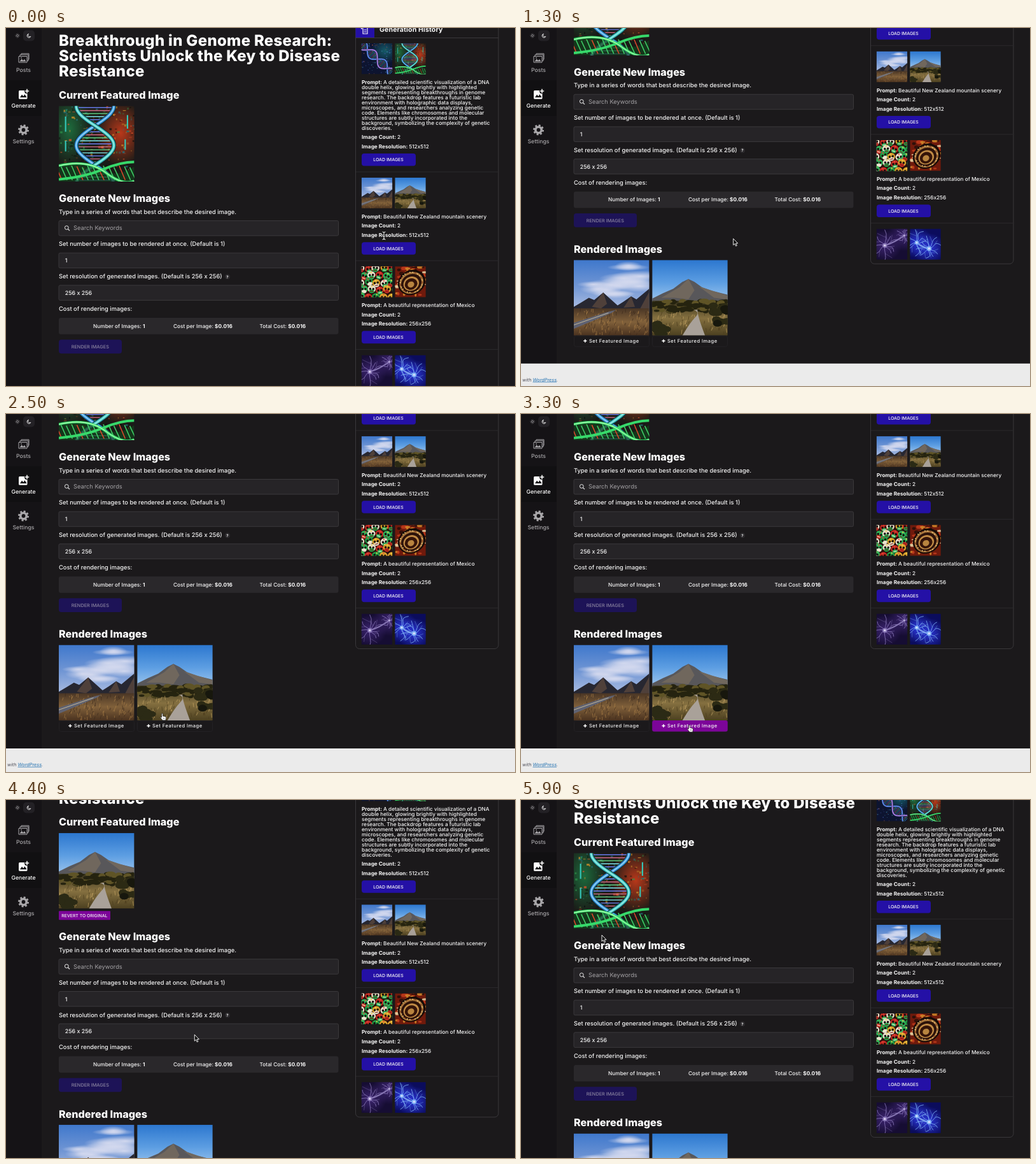
An HTML page that plays this animation: 800x562 px, repeating every 6000 ms.

```html
<!DOCTYPE html>
<html lang="en">
<head>
<meta charset="utf-8">
<title>Image generator</title>
<style>
  html, body { margin: 0; width: 100%; height: 100%; overflow: hidden; background: #1b191b; }
  svg { display: block; }
  #stage { width: 800px; height: 562px; }
  text { font-family: Inter, sans-serif; font-optical-sizing: none; text-rendering: geometricPrecision; white-space: pre; }
</style>
</head>
<body>
<script>
const LOOP = 6000;
const BLUE = '#2410a6', PURPLE = '#7c0599';

// ---------- drawing helpers ----------
const text = (x, y, size, str, { fill = '#f6f6f6', weight = 500, more = '' } = {}) =>
  `<text x="${x}" y="${y}" font-size="${size}" fill="${fill}" font-weight="${weight}" ${more}>${str}</text>`;
const rect = (x, y, w, h, fill, more = '') =>
  `<rect x="${x}" y="${y}" width="${w}" height="${h}" fill="${fill}" ${more}/>`;
const path = (d, fill, more = '') => `<path d="${d}" fill="${fill}" ${more}/>`;
const line = (d, color, width = 1, more = '') =>
  `<path d="${d}" fill="none" stroke="${color}" stroke-width="${width}" ${more}/>`;
const dot = (x, y, r, fill, more = '') => `<circle cx="${x}" cy="${y}" r="${r}" fill="${fill}" ${more}/>`;
const oval = (x, y, rx, ry, fill, more = '') =>
  `<ellipse cx="${x}" cy="${y}" rx="${rx}" ry="${ry}" fill="${fill}" ${more}/>`;
const bold = s => `<tspan font-weight="650">${s}</tspan>`;
const pic = (id, x, y, size) => `<use href="#${id}" x="${x}" y="${y}" width="${size}" height="${size}"/>`;
const many = (n, fn) => Array.from({ length: n }, (_, i) => fn(i)).join('');
const centred = 'text-anchor="middle"';

function random(seed) {
  return () => {
    seed = (seed + 0x6D2B79F5) | 0;
    let v = Math.imul(seed ^ (seed >>> 15), 1 | seed);
    v = (v + Math.imul(v ^ (v >>> 7), 61 | v)) ^ v;
    return ((v ^ (v >>> 14)) >>> 0) / 4294967296;
  };
}

const gradient = (id, ...stops) =>
  `<linearGradient id="${id}" x1="0" y1="0" x2="0" y2="1">${stops.map((c, i) =>
    `<stop offset="${i / (stops.length - 1)}" stop-color="${c}"/>`).join('')}</linearGradient>`;
const glow = (id, color) =>
  `<radialGradient id="${id}"><stop offset="0" stop-color="${color}"/><stop offset="1" stop-color="${color}" stop-opacity="0"/></radialGradient>`;
const symbol = (id, body) => `<symbol id="${id}" viewBox="0 0 100 100">${body}</symbol>`;

// ---------- pictures, each on a 100 x 100 field ----------
function helix(cx, amp, half, start, colors, rungs) {
  const at = (y, s) => cx + s * amp * Math.sin(Math.PI * (y - start) / half);
  const strand = s => 'M' + many(71, i => `${at(i * 2 - 20, s).toFixed(1)} ${i * 2 - 20} `);
  const bars = many(34, i => {
    const y = i * 4 - 18;
    return line(`M${at(y, -1)} ${y}H${at(y, 1)}`, rungs[i % rungs.length], 1.4, 'opacity=".85"');
  });
  return bars + [-1, 1].map((s, i) =>
    line(strand(s), '#12323f', 6) + line(strand(s), colors[i], 4) +
    line(strand(s), '#d8f4ff', 1, 'opacity=".8"')).join('');
}

function dnaLab() {
  const r = random(11);
  return rect(0, 0, 100, 100, '#1a1b17') +
    oval(82, 36, 34, 44, 'url(#red)') + oval(14, 30, 30, 50, 'url(#green)') +
    many(200, () => rect(r() * 100, r() * 85, 1 + r() * 3, 1 + r() * 2,
      ['#d8502a', '#2f9a4c', '#c58b2c', '#27717a', '#0c0f0c'][r() * 5 | 0], `opacity="${.3 + r() * .55}"`)) +
    line('M9 14V34M9 46V60M91 12V30M88 44V58', '#35c6b8', 1.8) +
    helix(48, 25, 52, 26, ['#3a9be0', '#45cfc4'], ['#7fe6ee', '#6a7cf0', '#e0708c', '#62d98a']) +
    path('M0 100V76Q30 72 54 84T100 80V100Z', '#123f1c', 'opacity=".75"') +
    many(16, i => line(`M${i * 7 - 4} ${79 + i % 3}L${i * 7 + 4} 98`, i % 4 ? '#3fd168' : '#e0482c', 1.3)) +
    line('M0 79Q38 70 62 88T100 99M0 97Q34 94 58 84T100 74', '#37d96b', 3.2) +
    line('M0 79Q38 70 62 88T100 99', '#b9ffb6', .9);
}

function dnaBlue() {
  const r = random(5);
  return rect(0, 0, 100, 100, '#0d1430') + oval(76, 24, 46, 44, 'url(#teal)') +
    many(90, () => dot(r() * 100, r() * 100, .6 + r() * 1.6, ['#3f8fae', '#93503f', '#3c4fa0'][r() * 3 | 0], 'opacity=".7"')) +
    `<g transform="rotate(-47 50 50)">${helix(50, 15, 44, 8, ['#3d63e0', '#9a55d8'], ['#45b7ec', '#e0629a', '#7bdc8c'])}</g>`;
}

const grass = (r, n, top, light, dark) => many(n, () => {
  const x = r() * 100, y = top + r() * (100 - top);
  return line(`M${x} ${y}l${r() * 3 - 1} -${2 + r() * 4}`, r() < .5 ? light : dark, .8, 'opacity=".7"');
});

function valley() {
  const r = random(3);
  return rect(0, 0, 100, 70, 'url(#sky1)') +
    many(14, () => oval(r() * 100, 8 + r() * 44, 18 + r() * 22, 4 + r() * 5, 'url(#cloud)')) +
    path('M0 62L10 56 20 50 27 53 39 43 50 53 58 60 66 55 76 48 83 52 100 38V72H0Z', '#272731') +
    path('M39 43L44 58 36 64 24 62ZM76 48L81 62 66 63ZM100 42V66L88 64Z', '#59463c', 'opacity=".8"') +
    rect(0, 64, 100, 36, 'url(#grass1)') + grass(r, 130, 68, '#ad8048', '#3c291c') +
    path('M0 83L44 69 56 66 50 70 0 91Z', '#5f6272') + line('M0 86L46 70', '#d8c9a0', .7);
}

function track() {
  const r = random(8);
  return rect(0, 0, 100, 60, 'url(#sky2)') +
    path('M0 51L14 44 28 38 40 29 48 25 56 29 66 36 80 41 100 46V64H0Z', '#58575a') +
    path('M48 25L56 40 48 52 30 50 12 50 36 36ZM62 35L82 50 100 52V47Z', '#786c5e', 'opacity=".75"') +
    rect(0, 54, 100, 46, 'url(#grass2)') +
    many(75, () => oval(r() * 100, 54 + r() * 14, 3 + r() * 5, 1.5 + r() * 2, r() < .75 ? '#25230f' : '#5f5426')) +
    grass(r, 110, 72, '#c7a765', '#4a3a1c') +
    path('M55 66Q64 69 57 76T40 100H70Q64 84 62 77T60 66Z', '#a9a199') +
    many(24, () => oval(80 + r() * 22, 60 + r() * 24, 6, 4.5, r() < .5 ? '#17170d' : '#2c2a14')) +
    many(12, () => oval(r() * 20, 82 + r() * 18, 6, 4, '#2b2a15'));
}

function skulls() {
  const r = random(21);
  const tones = ['#1f9a45', '#e6ddc8', '#c32d23', '#2fb35a', '#d9a22e'];
  return rect(0, 0, 100, 100, '#2a0f0c') + many(25, i => {
    const row = i / 5 | 0, x = (i % 5) * 25 + (row % 2) * 12 - 6 + r() * 6, y = row * 23 + 3 + r() * 6;
    return `<g transform="translate(${x} ${y}) rotate(${r() * 50 - 25})">` +
      oval(0, 0, 13, 12, tones[r() * 5 | 0]) + oval(0, 8, 8, 6, tones[r() * 5 | 0]) +
      dot(-5, 0, 3.6, '#140c0b') + dot(5, 0, 3.6, '#140c0b') +
      rect(-5, 7, 10, 2.2, i % 2 ? '#fff1d8' : '#7b1a14') + dot(0, -8, 2.2, i % 2 ? '#e8423a' : '#f1cf4a') + '</g>';
  });
}

function bowl() {
  const r = random(17);
  const rings = [[46, '#170b07'], [40, '#a8763c'], [34, '#2c120a'], [26, '#c08a45'], [21, '#351409'], [11, '#b8843f']];
  return rect(0, 0, 100, 100, '#6f1a0c') +
    many(60, () => oval(r() * 100, r() * 100, 3 + r() * 8, 2 + r() * 4,
      ['#c23a1c', '#240d09', '#d48a2a', '#e8d0a0'][r() * 4 | 0], 'opacity=".85"')) +
    `<g transform="rotate(-28 54 52)">${rings.map(([s, c], i) => oval(54 - i, 52 + i, s, s * .86, c)).join('')}</g>` +
    many(26, i => {
      const a = i * Math.PI / 13;
      return oval(53 + 36 * Math.cos(a), 52 + 33 * Math.sin(a), 2.2, 1.6, i % 3 ? '#f0cd84' : '#7a2c14');
    });
}

// cells: [x, y, reach]; the first two are joined by a thick axon
function neurons(seed, base, halo, color, cells) {
  const r = random(seed);
  const [[x0, y0], [x1, y1]] = cells;
  const axon = `M${x0} ${y0}Q${(x0 + x1) / 2} ${(y0 + y1) / 2 + 7} ${x1} ${y1}`;
  return rect(0, 0, 100, 100, base) + cells.map(([x, y, reach]) => oval(x, y, 55, 50, `url(#${halo})`)).join('') +
    line(axon, color, 5, 'opacity=".75"') + line(axon, '#dcd2ff', 1, 'opacity=".6"') +
    cells.map(([x, y, reach]) => many(9, i => {
      const a = i * Math.PI / 4.5 + r() * .5, len = reach * (.6 + r() * .6);
      const point = (d, turn) => [x + d * Math.cos(a + turn), y + d * Math.sin(a + turn)];
      const mid = point(len * .5, r() * .7 - .35);
      return line(`M${x} ${y}Q${point(len * .25, .3)} ${mid}T${point(len, .15)}`, color, 1.7) +
        line(`M${mid}L${point(len * .9, -.4)}`, color, 1, 'opacity=".8"');
    }) + dot(x, y, reach * .17, color) + dot(x, y, reach * .08, '#f0e8ff', 'opacity=".8"')).join('');
}

const defs = `<defs>
  ${gradient('sky1', '#3f78cc', '#7196d4', '#b4c3e4')}
  ${gradient('sky2', '#2c77cf', '#5d9ee2', '#a9cdf0')}
  ${gradient('grass1', '#4a3625', '#80603a', '#4a321f')}
  ${gradient('grass2', '#38331c', '#857040', '#4c4020')}
  ${glow('red', '#b8381a')}${glow('green', '#1d6a3c')}${glow('teal', '#155a68')}${glow('cloud', '#d2d8ee')}
  ${glow('violet', '#3c2470')}${glow('azure', '#2a35d6')}
  ${symbol('lab', dnaLab())}${symbol('dna', dnaBlue())}
  ${symbol('valley', valley())}${symbol('track', track())}
  ${symbol('skulls', skulls())}${symbol('bowl', bowl())}
  ${symbol('cellA', neurons(4, '#160d33', 'violet', '#8a78b8', [[27, 54, 44], [90, 22, 24]]))}
  ${symbol('cellB', neurons(9, '#0b0c5c', 'azure', '#7fb2f4', [[22, 45, 38], [62, 64, 46]]))}
</defs>`;

// ---------- history panel ----------
const STEP = 7.95;
const history = [
  { pics: ['dna', 'lab'], size: '512x512', prompt: [
    'A detailed scientific visualization of a DNA', 'double helix, glowing brightly with highlighted',
    'segments representing breakthroughs in genome', 'research. The backdrop features a futuristic lab',
    'environment with holographic data displays,', 'microscopes, and researchers analyzing genetic',
    'code. Elements like chromosomes and molecular', 'structures are subtly incorporated into the',
    'background, symbolizing the complexity of genetic', 'discoveries.'] },
  { pics: ['valley', 'track'], size: '512x512', prompt: ['Beautiful New Zealand mountain scenery'], sweep: true },
  { pics: ['skulls', 'bowl'], size: '256x256', prompt: ['A beautiful representation of Mexico'] },
  { pics: ['cellA', 'cellB'] }
];

function panel() {
  let y = 24;
  const items = history.map(({ pics, size, prompt, sweep }) => {
    let out = pic(pics[0], 558.7, y, 48.5) + pic(pics[1], 611.3, y, 48.5);
    if (!prompt) return out;
    prompt.forEach((s, i) => out += text(559, y + 64 + i * STEP, 8.25, (i ? '' : bold('Prompt: ')) + s));
    y += (prompt.length - 1) * STEP;
    out += text(559, y + 78.6, 8.25, bold('Image Count: ') + '2') +
      text(559, y + 93.2, 8.25, bold('Image Resolution: ') + size) +
      rect(559, y + 101.4, 85, 19.6, BLUE, 'rx="4"') +
      (sweep ? rect(559, y + 101.4, 0, 19.6, PURPLE, 'id="loadSweep" rx="3"') : '') +
      text(601, y + 113.7, 7, 'LOAD IMAGES', { more: centred }) +
      line(`M550 ${y + 130.4}H774`, '#2b292c');
    y += 139.3;
    return out;
  }).join('');
  return line('M549.5 -30V562.5a6 6 0 0 0 6 6H768a6 6 0 0 0 6 -6V-30', '#3a383b') +
    rect(549.5, -20, 29.5, 35, BLUE) + line('M550 15.5H774', '#3a383b') +
    line('M560 -2h8v11h-7v-8h-2.500v-3M562.500 3h4M562.500 6h4', '#fff', 1.1) +
    text(587, 6, 10.6, 'Generation History', { weight: 700, more: 'letter-spacing=".1"' }) + items;
}

// ---------- main column ----------
const heading = (y, s) => text(83, y, 16.2, s, { weight: 800, fill: '#fff' });
const label = (y, s) => text(83, y, 9.32, s);
const field = y => rect(83, y, 439.5, 23.5, '#262427', 'stroke="#3b393c" rx="2"');
const caption = (x, s, id) => text(x, 692.4, 7.6, s, { more: `${centred} letter-spacing=".45" id="${id}"` });
const plus = (x, id) => line(`M${x} 689.500h5.200m-2.600-2.600v5.200`, '#fff', 1.5, `id="${id}"`);
const frame = x => rect(x, 681.5, 118, 17, 'none', 'stroke="#232124" rx="3"');

const title = ['Breakthrough in Genome Research:', 'Scientists Unlock the Key to Disease', 'Resistance'];
const column = title.map((s, i) =>
  text(83, 28.3 + i * 24, 24, s, { weight: 800, fill: '#fff', more: 'letter-spacing=".3"' })).join('') +
  heading(111, 'Current Featured Image') +
  `<use id="featured" href="#lab" x="83" y="122.500" width="118.600" height="118.600"/>` +
  `<g id="revert">${rect(83, 245, 81, 14, PURPLE, 'rx="1"')}${text(87.3, 254.5, 6.87, 'REVERT TO ORIGINAL')}</g>`;

const form = heading(273, 'Generate New Images') +
  label(291.5, 'Type in a series of words that best describe the desired image.') + field(302.5) +
  `<circle cx="95.300" cy="313.500" r="2.900" fill="none" stroke="#eee"/>` + line('M97.400 315.600L100 318.200', '#eee', 1.2) +
  text(106, 317.4, 9.3, 'Search Keywords', { fill: '#a3a1a4', weight: 400 }) +
  label(342.3, 'Set number of images to be rendered at once. (Default is 1)') + field(353.2) +
  text(92.7, 368.2, 8.9, '1') +
  label(393.3, 'Set resolution of generated images. (Default is 256 x 256)') + field(403.9) +
  dot(348, 390.4, 4, '#2c2a2d') + text(348, 392.6, 6, '?', { weight: 700, more: centred }) +
  text(92.7, 419, 8.9, '256 x 256') +
  label(444, 'Cost of rendering images:') + rect(83, 455, 439.5, 25.7, '#2a282b', 'rx="3"') +
  text(137, 470.6, 8.3, 'Number of Images: ' + bold('1')) +
  text(263, 470.6, 8.3, 'Cost per Image: ' + bold('$0.016')) +
  text(398.5, 470.6, 8.3, 'Total Cost: ' + bold('$0.016')) +
  rect(83, 489.3, 99, 21.6, '#1d1357', 'rx="4"') +
  text(132.3, 502.8, 7.3, 'RENDER IMAGES', { fill: '#89839f', more: centred });

const results = heading(551.3, 'Rendered Images') +
  pic('valley', 83, 562.5, 118.6) + pic('track', 206.2, 562.5, 118.6) + frame(83.5) + frame(206.5) +
  rect(206.2, 681, 0, 17.5, PURPLE, 'id="setSweep" rx="3"') +
  plus(98.2, 'plusA') + plus(221.4, 'plusB') +
  caption(146.3, 'Set Featured Image', 'capA') + caption(269.3, 'Set Featured Image', 'capB');

// ---------- sidebar and footer ----------
const GREY = '#a9a7aa';
const menu = (y, s, fill) => text(27.5, y, 8.7, s, { fill, more: centred });
const sidebar = rect(0, 0, 56, 562, '#151316') + rect(0, 82, 56, 56, '#111012') +
  dot(18, 12, 1.5, 'none', `stroke="${GREY}" stroke-width=".8"`) +
  dot(18, 12, 3, 'none', `stroke="${GREY}" stroke-width="1" stroke-dasharray=".8 1.556"`) +
  rect(27, 3.5, 18, 17, '#232125', 'rx="5"') +
  path('M35.500 9.200a3 3 0 1 0 3.400 4a2.600 2.600 0 0 1 -3.400 -4z', 'none', 'stroke="#eee" stroke-width=".9"') +
  line('M20 44.500h13v9.500h-13zM22 44v-2h13v9.500h-2M24 42v-1.800h12v9h-1.500', GREY, 1) +
  path('M21.500 52.500l3-4 2.500 2.500 2-2 2.500 3.500z', GREY) + dot(24, 46.8, .9, GREY) +
  menu(68.5, 'Posts', GREY) +
  rect(20, 98, 13.5, 13.5, '#fff', 'rx="1.500"') + path('M22 109l3-4.500 2.300 2.700 2.200-3.200 3 5z', '#111012') +
  dot(33, 99, 4.2, '#111012') + line('M29.800 99h6.400M33 95.800v6.400', '#fff', 1.6) +
  menu(125.2, 'Generate', '#fff') +
  dot(27.5, 160, 4.7, 'none', `stroke="${GREY}" stroke-width="3.600"`) +
  dot(27.5, 160, 7.2, 'none', `stroke="${GREY}" stroke-width="2.600" stroke-dasharray="2.900 2.755"`) +
  menu(181.4, 'Settings', GREY);

const footer = rect(0, 725, 800, 80, '#ebebeb') + text(2, 752.8, 7.3,
  'with <tspan fill="#2271b1" text-decoration="underline">WordPress</tspan>.',
  { fill: '#50505a', weight: 400, more: 'font-style="italic"' });

// ---------- pointer shapes, hot spot at 0,0 ----------
const BEAM = 'M-2.500-6Q0-6 0-4V4Q0 6-2.500 6M2.500-6Q0-6 0-4V4Q0 6 2.500 6M-1.500 1.500h3';
const pointers = {
  beam: line(BEAM, '#111', 2.6) + line(BEAM, '#e4e4e4', 1.1),
  arrow: path('M0 0V10L2.300 7.900 3.900 11.600 5.600 10.900 4 7.300H7.100Z', '#111', 'stroke="#fff" stroke-width=".9"'),
  hand: path('M-1 4.800V.7a1 1 0 0 1 2 0V4l3.800.8q1.400.4 1.200 1.900L5.300 10.700H.4L-2.800 6.600Q-3.200 5.300-2 5.300L-1 6.200Z',
    '#fff', 'stroke="#111" stroke-width=".7"') + line('M1.800 6.500v2M3.300 6.500v2', '#333', .5)
};

document.body.innerHTML = `<svg id="stage" viewBox="0 0 800 562" xmlns="http://www.w3.org/2000/svg">${defs}
  ${rect(0, 0, 800, 562, '#1b191b')}
  <g id="page">${column}<g id="lower">${form}<g id="results">${results}</g></g>${panel()}</g>
  ${sidebar}<g id="footer">${footer}</g>
  <g id="pointer">${Object.entries(pointers).map(([k, v]) => `<g id="${k}">${v}</g>`).join('')}</g></svg>`;

// ---------- timeline ----------
const $ = id => document.getElementById(id);
const part = (t, from, to) => Math.min(1, Math.max(0, (t - from) / (to - from)));
const inOut = u => u < .5 ? 2 * u * u : 1 - 2 * (1 - u) ** 2;
const outQuart = u => 1 - (1 - u) ** 4;
const show = (id, on) => $(id).setAttribute('visibility', on ? 'visible' : 'hidden');
const move = (id, x, y) => $(id).setAttribute('transform', `translate(${x} ${y})`);

const route = [
  [0, 594, 326], [50, 594, 326], [300, 604, 346], [540, 604, 346], [780, 333.7, 330.7], [1300, 333.7, 330.7],
  [1750, 230.5, 455.5], [2100, 230.5, 455.5], [2950, 264.5, 488.5], [3450, 264.5, 488.5],
  [3880, 296.3, 368.3], [5000, 296.3, 368.3], [5450, 127, 212], [LOOP, 127, 212]
];
const shapes = [[0, 'beam'], [200, 'hand'], [580, 'arrow'], [1600, 'hand'], [3640, 'arrow'], [5400, 'hand'], [5720, 'arrow']];

function pointerAt(t) {
  const i = route.findIndex(p => p[0] > t);
  const [t0, x0, y0] = route[i - 1], [t1, x1, y1] = route[i];
  const u = inOut(part(t, t0, t1));
  return [x0 + (x1 - x0) * u, y0 + (y1 - y0) * u];
}

function render(t) {
  const scroll = 200 * outQuart(part(t, 606, 1606)) - 161 * inOut(part(t, 3900, 4630));
  const chosen = t >= 3600;
  const swapped = chosen && t < 5700;
  const shift = swapped ? 18 : 0;

  move('page', 0, -scroll);
  move('lower', 0, shift);
  move('footer', 0, shift - scroll);
  show('revert', swapped);
  show('results', t >= 500);
  $('featured').setAttribute('href', swapped ? '#track' : '#lab');

  $('loadSweep').setAttribute('width', 85 * (part(t, 230, 500) - part(t, 570, 870)));
  $('setSweep').setAttribute('width', chosen ? 0 : 118.6 * part(t, 2780, 3060));
  $('capB').textContent = swapped ? 'Current Featured Image' : 'Set Featured Image';
  $('capB').setAttribute('x', swapped ? 265.5 : 269.3);
  $('plusB').setAttribute('opacity', swapped ? 0 : 1);

  move('pointer', ...pointerAt(t));
  const shape = shapes.filter(s => s[0] <= t).pop()[1];
  Object.keys(pointers).forEach(k => show(k, k === shape));
}

const start = performance.now();
function tick() {
  render((performance.now() - start) % LOOP);
  requestAnimationFrame(tick);
}
tick();
</script>
</body>
</html>
```
